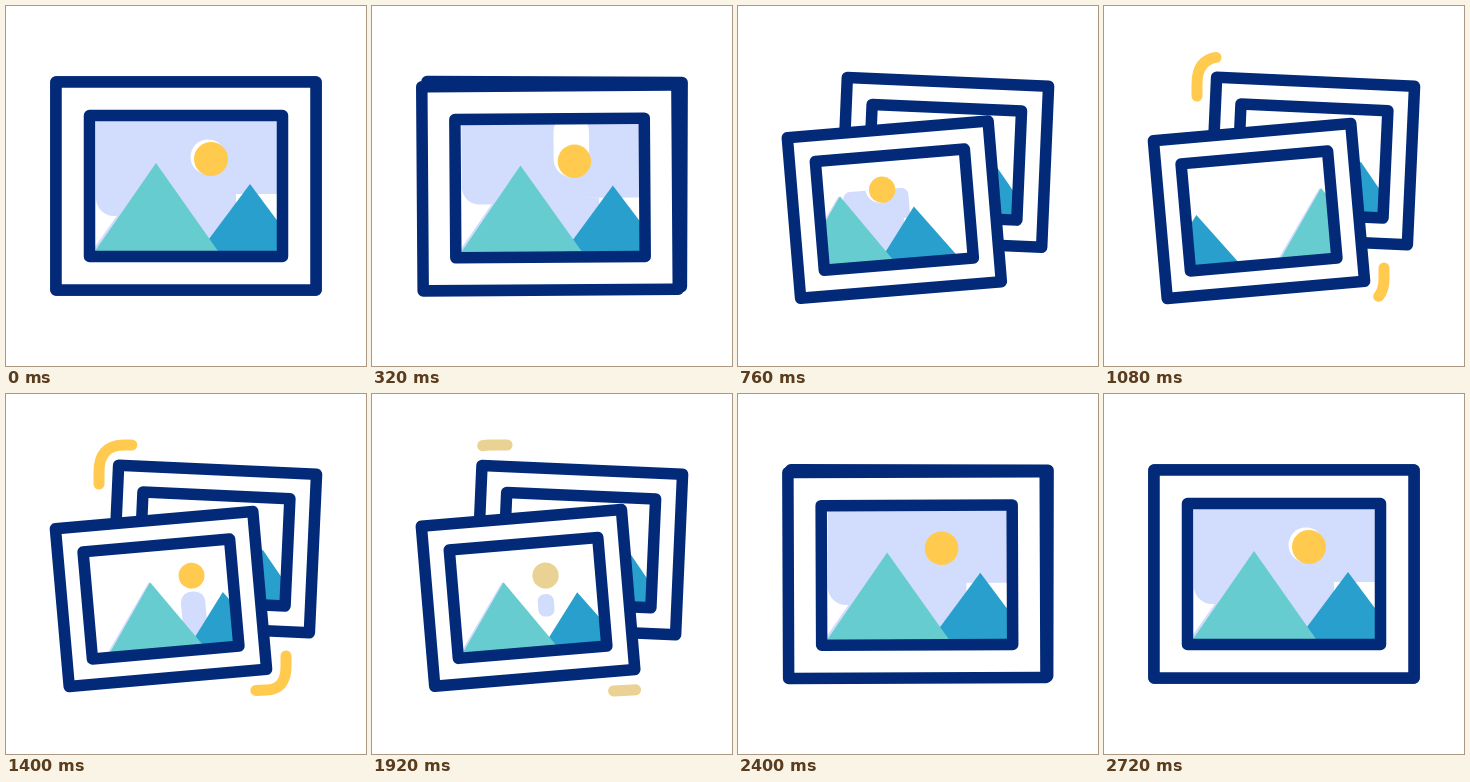
An HTML page with a canvas for the animation above (2800 ms loop, 360 px wide and 360 px high).

```html
<!DOCTYPE html>
<html>
<head>
<meta charset="utf-8">
<style>
html, body { margin: 0; width: 100%; height: 100%; overflow: hidden; background: #fff; }
canvas { display: block; }
</style>
</head>
<body>
<canvas width="360" height="360"></canvas>
<script>
const ctx = document.querySelector('canvas').getContext('2d');
const NAVY = '#022a78', TEAL = '#67cccf', BLUE = '#289fcd', SKY = '#d2dcfd';
const LOOP = 2800, STEP = 40, SCROLL = 260, LINE = 11.5;
ctx.lineJoin = ctx.lineCap = 'round';

const lerp = (a, b, u) => a + (b - a) * u;
const ease = (t, from, to) => {
  const u = Math.min(1, Math.max(0, (t - from) / (to - from)));
  return u * u * (3 - 2 * u);
};

// Piecewise linear track of [time, value] pairs; values may be arrays.
function track(t, keys) {
  if (t <= keys[0][0]) return keys[0][1];
  for (let i = 1; i < keys.length; i++) {
    const [t0, a] = keys[i - 1], [t1, b] = keys[i];
    if (t <= t1) {
      const u = (t - t0) / (t1 - t0);
      return Array.isArray(a) ? a.map((v, j) => lerp(v, b[j], u)) : lerp(a, b, u);
    }
  }
  return keys[keys.length - 1][1];
}

function box(x0, y0, x1, y1, r) {
  ctx.roundRect(x0, y0, x1 - x0, y1 - y0, r);
}

function triangle(color, x, y, left, right) {
  ctx.fillStyle = color;
  ctx.beginPath();
  ctx.moveTo(x, y);
  ctx.lineTo(right, 65);
  ctx.lineTo(left, 65);
  ctx.fill();
}

function sky(t) {
  const full = [-95, -70, 95, 70, 0], stem = [8, -6, 40, 66, 14];
  const shown = track(t, [[560, full], [860, stem], [1400, stem],
    [1920, [12, -3, 33, 26, 9]], [2320, full]]);
  const gap = track(t, [[0, 0], [520, 1], [1400, 1], [1920, 0]]);
  ctx.save();
  ctx.beginPath();
  box(...shown);
  ctx.clip();
  ctx.fillStyle = SKY;
  ctx.beginPath();
  box(-90, -80, 30, 30 - 22 * gap, 18);
  box(10, -80, 110, 8 + 4 * gap, 18);
  box(-25, -30, 50, 70, 0);
  ctx.fill();
  if (t < 1900 || t > 2500) {
    ctx.strokeStyle = '#fff';
    ctx.lineWidth = 35 + 2 * gap;
    ctx.beginPath();
    ctx.moveTo(22, -29);
    ctx.lineTo(22, -29.01 - 46 * gap);
    ctx.stroke();
  }
  ctx.restore();
}

function scene(t, shift, yellow) {
  ctx.save();
  ctx.translate(shift, 0);
  sky(t);
  triangle(SKY, -32, -23, -94, 30);
  mountains();
  ctx.fillStyle = yellow;
  ctx.beginPath();
  ctx.arc(25, -27, 17, 0, 7);
  ctx.fill();
  ctx.restore();
}

function mountains() {
  triangle(BLUE, 64, -2, 14, 114);
  triangle(TEAL, -30, -23, -91, 32);
}

function picture(x, y, degrees, scale, content) {
  const frame = (w, h) => {
    ctx.strokeStyle = NAVY;
    ctx.lineWidth = LINE;
    ctx.strokeRect(-w * scale / 2, -h * scale / 2, w * scale, h * scale);
  };
  ctx.save();
  ctx.translate(x, y);
  ctx.rotate(degrees * Math.PI / 180);
  ctx.fillStyle = '#fff';
  ctx.fillRect(-130 * scale, -104 * scale, 260 * scale, 208 * scale);
  ctx.save();
  ctx.scale(scale, scale);
  ctx.beginPath();
  ctx.rect(-96, -70, 192, 140);
  ctx.clip();
  content();
  ctx.restore();
  frame(193, 141);
  frame(260, 208);
  ctx.restore();
}

function spark(path, length, start, end, color) {
  if (end - start < 0.01) return;
  ctx.save();
  ctx.strokeStyle = color;
  ctx.lineWidth = 11;
  ctx.setLineDash([(end - start) * length, 200]);
  ctx.lineDashOffset = -start * length;
  ctx.stroke(path);
  ctx.restore();
}

const upper = new Path2D('M93 90V78Q93 51 118 51H138');
const lower = new Path2D('M280 262V272Q280 296 260 296L241 297');

function draw(t) {
  const open = ease(t, 210, 850) - ease(t, 1840, 2480);
  const slide = SCROLL * ease(t, 500, 1570);
  const fade = track(t, [[1600, 0], [1920, 1], [2280, 0]]);
  const yellow = `rgb(${lerp(255, 234, fade)},${lerp(202, 209, fade)},${lerp(77, 148, fade)})`;
  const scale = lerp(1, 0.762, open);

  ctx.fillStyle = '#fff';
  ctx.fillRect(0, 0, 360, 360);
  picture(180 + 28 * open, 180 - 25 * open, 2.6 * open, scale, mountains);
  picture(180 - 25 * open, 180 + 25 * open, -5 * open, scale, () => {
    if (slide < SCROLL) scene(t, -slide, yellow);
    if (slide > 0) scene(t, SCROLL - slide, yellow);
  });

  const start = track(t, [[1500, 0], [1920, 0.66], [2280, 1]]);
  const late = [[1400, 0.87], [1760, 1]];
  spark(upper, 71, start, track(t, [[840, 0], [1080, 0.68], ...late]), yellow);
  spark(lower, 64, start, track(t, [[960, 0], [1080, 0.46], ...late]), yellow);
}

function tick() {
  const t = performance.now() % LOOP;
  draw(Math.min(LOOP - 2 * STEP, Math.floor(t / STEP) * STEP));
  requestAnimationFrame(tick);
}
tick();
</script>
</body>
</html>
```
